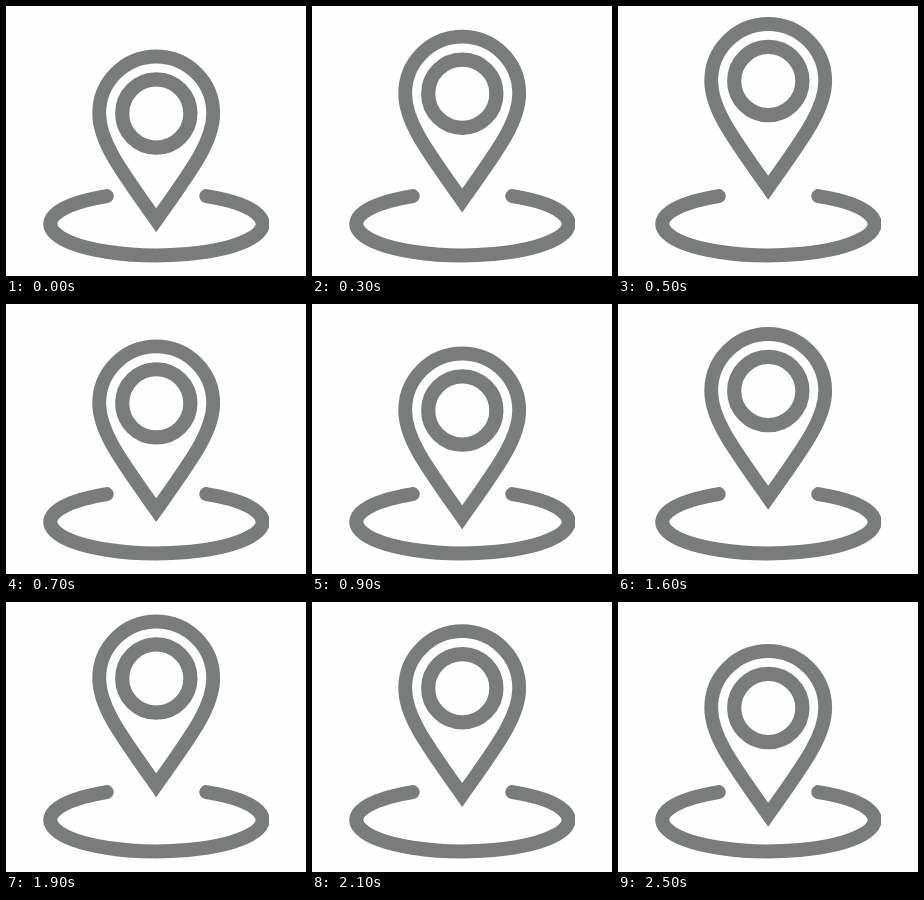
Animation, 300 px wide and 270 px high, one loop 2.6 s. Source, as an HTML page with a canvas:

```html
<!DOCTYPE html>
<html lang="en">
<head>
<meta charset="utf-8">
<title>Bouncing map pin</title>
<style>
  html, body { margin: 0; width: 100%; height: 100%; overflow: hidden; background: #fefefe; }
  canvas { display: block; width: 300px; height: 270px; }
</style>
</head>
<body>
<canvas id="stage" width="300" height="270"></canvas>
<script>
const ctx = document.getElementById('stage').getContext('2d');
const LOOP = 2600, STEP = 100, GREY = '#7a7c7b';

// Height of the pin's centre: [time in ms, y]
const keys = [
  [0, 107.5], [250, 91.5], [500, 75], [600, 85.5], [800, 107.7], [900, 106.5],
  [1200, 101], [1600, 87], [1800, 79.5], [1900, 76.5], [2100, 86.2],
  [2400, 104.5], [2500, 106], [2600, 107.5]
];

// Tangent at a key, flat at the turning points
function slope(i) {
  const a = keys[i - 1], b = keys[i], c = keys[i + 1];
  if (!a || !c || (b[1] - a[1]) * (c[1] - b[1]) <= 0) return 0;
  return (c[1] - a[1]) / (c[0] - a[0]);
}

function pinY(t) {
  let i = 0;
  while (t >= keys[i + 1][0]) i++;
  const [t0, y0] = keys[i], [t1, y1] = keys[i + 1];
  const d = t1 - t0, u = (t - t0) / d, v = 1 - u;
  return y0 * (1 + 2 * u) * v * v + y1 * u * u * (3 - 2 * u)
    + d * u * v * (slope(i) * v - slope(i + 1) * u);
}

function drawBase() {
  const gap = 0.488;
  ctx.save();
  ctx.beginPath();
  ctx.rect(0, 0, 263, 270);
  ctx.clip();
  ctx.lineWidth = 14;
  ctx.lineCap = 'round';
  ctx.beginPath();
  ctx.ellipse(150.5, 217.9, 106.2, 31.5, 0, -Math.PI / 2 + gap, Math.PI * 1.5 - gap);
  ctx.stroke();
  ctx.restore();
}

function drawPin(y) {
  const r = 57;
  ctx.save();
  ctx.translate(150.2, y);
  ctx.lineWidth = 13.8;
  ctx.lineJoin = 'miter';
  ctx.beginPath();
  ctx.arc(0, 0, r, Math.PI, 0);
  ctx.bezierCurveTo(r, 28, 36, 56, 0, 106.8);
  ctx.bezierCurveTo(-36, 56, -r, 28, -r, 0);
  ctx.closePath();
  ctx.stroke();
  ctx.lineWidth = 14.2;
  ctx.beginPath();
  ctx.arc(0.1, 0, 34.1, 0, Math.PI * 2);
  ctx.stroke();
  ctx.restore();
}

function draw(now) {
  const t = Math.floor(now % LOOP / STEP) * STEP;
  ctx.fillStyle = '#fefefe';
  ctx.fillRect(0, 0, 300, 270);
  ctx.strokeStyle = GREY;
  drawBase();
  drawPin(pinY(t));
}

const start = performance.now();
function tick() {
  draw(performance.now() - start);
  requestAnimationFrame(tick);
}
tick();
</script>
</body>
</html>
```
